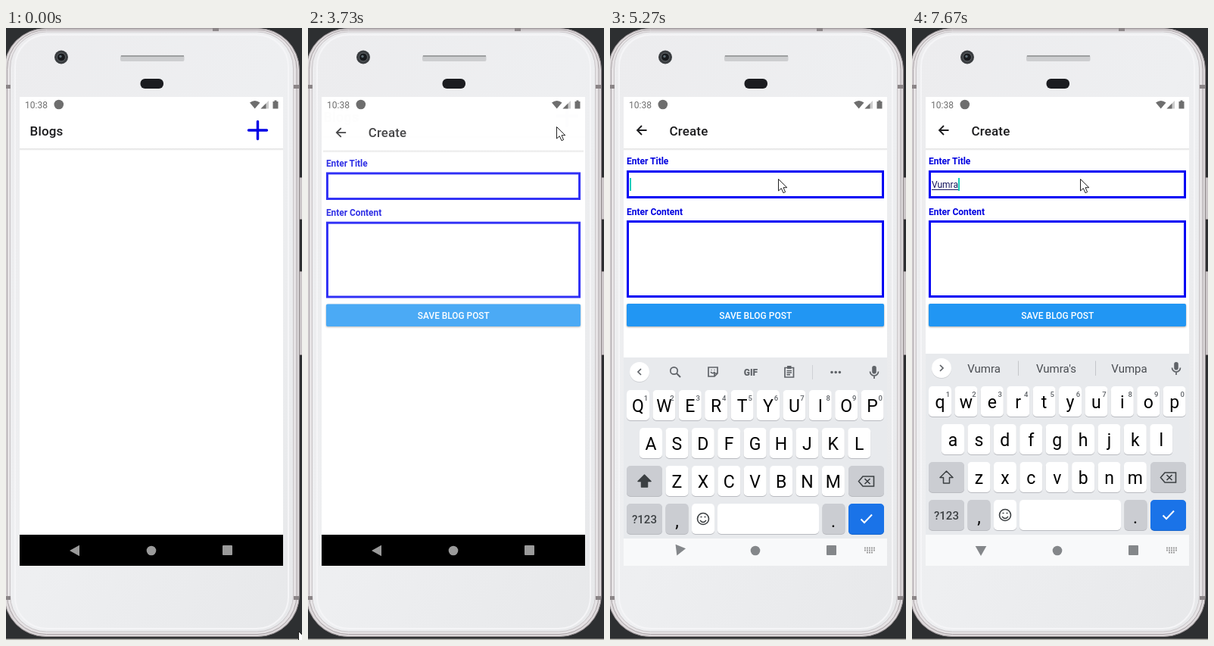
Write an HTML page that moves like this. It is 391x808 px and loops after 8 s.

```html
<!DOCTYPE html>
<html lang="en">
<head>
<meta charset="utf-8">
<title>Blog app demo</title>
<style>
  html, body { margin: 0; width: 100%; height: 100%; overflow: hidden; background: #2d2f31; }
  svg { display: block; font-family: Roboto, sans-serif; }
  .title { font-size: 17px; font-weight: 500; letter-spacing: .15px; fill: #1c1c1e; }
  .label { font-size: 12px; font-weight: 700; fill: #0000e0; }
  .box { fill: #fff; stroke: #0000f4; stroke-width: 3; }
  .button { fill: #2196f3; filter: drop-shadow(0 1px 1px #0005); }
  .mid { text-anchor: middle; }
  .line { fill: none; stroke: #5f6368; stroke-width: 1.7; }
  .dark { fill: none; stroke: #3c4043; stroke-width: 1.6; }
  .key { font-size: 23px; text-anchor: middle; }
  .hint { font-size: 9.5px; font-weight: 500; fill: #5f6368; text-anchor: middle; }
  .suggest { font-size: 15px; fill: #4a4d52; text-anchor: middle; }
</style>
</head>
<body>
<svg width="391" height="808" viewBox="0 0 391 808">
  <defs>
    <linearGradient id="body" x2="1" y2="1">
      <stop offset="0" stop-color="#ececee"/><stop offset=".5" stop-color="#eeeff1"/><stop offset="1" stop-color="#e7e8ea"/>
    </linearGradient>
    <linearGradient id="shade" x2="0" y2="1">
      <stop offset="0" stop-color="#dedede"/><stop offset="1" stop-color="#fff"/>
    </linearGradient>
    <clipPath id="page"><path d="M18 91H366V669H18z"/></clipPath>
    <clipPath id="screen"><path d="M18 91H366V710H18z"/></clipPath>
    <g id="header"><path d="M18 91H366V669H18z" fill="#fff"/><path d="M18 159H366V162H18z" fill="url(#shade)"/></g>
  </defs>

  <!-- phone -->
  <path d="M0 806.5H391V808H0z" fill="#b9b8b2"/>
  <g fill="#cbc6c8" stroke="#8a8385">
    <rect x="386" y="197.5" width="8" height="55" rx="2"/>
    <rect x="386" y="321.5" width="8" height="110" rx="2"/>
  </g>
  <rect x="-2.5" y=".5" width="390" height="803" rx="55" fill="#dcd8da" stroke="#8f888b"/>
  <rect x="1.5" y="2.5" width="382.5" height="798" rx="52" fill="#e6e3e5" stroke="#aaa3a6"/>
  <rect x="5.5" y="5" width="374" height="792" rx="48" fill="url(#body)" stroke="#c9c5c8"/>
  <rect x="12" y="9" width="361" height="784" rx="42" fill="none" stroke="#f5f5f7" stroke-width="2"/>
  <path d="M0 75H6V80H0zM380 75H387V80H380zM0 750H6V755H0zM380 750H387V755H380zM273 0H281V4H273z" fill="#8b8587"/>
  <circle cx="73" cy="38.5" r="9" fill="#3a3d40"/>
  <circle cx="73" cy="38.5" r="5.5" fill="#17191c" stroke="#62676a"/>
  <circle cx="72" cy="37.5" r="1.7" fill="#5c6b73"/>
  <rect x="151" y="36" width="84.5" height="8" rx="2" fill="#cdced0"/>
  <path d="M152 37H235" stroke="#8e8f91" stroke-width="1.5"/>
  <rect x="177.5" y="67" width="30.5" height="13" rx="6" fill="#1b1c20"/>

  <!-- app pages -->
  <path d="M18 91H366V669H18z" fill="#fff"/>
  <g clip-path="url(#page)">
    <g id="blogs">
      <use href="#header"/>
      <text class="title" x="31.5" y="141.5">Blogs</text>
      <path d="M320.5 135H344.500M332.500 123.500V146.500" stroke="#0000e6" stroke-width="3.4" stroke-linecap="round"/>
    </g>
    <g id="create">
      <use href="#header"/>
      <path d="M48.5 135H36.5M42 129L36 135L42 141" fill="none" stroke="#1c1c1e" stroke-width="1.8"/>
      <text class="title" x="78.5" y="141.5">Create</text>
      <text class="label" x="22" y="180">Enter Title</text>
      <rect class="box" x="23.5" y="189.5" width="337" height="34"/>
      <text class="label" x="22" y="246.5">Enter Content</text>
      <rect class="box" x="23.5" y="255.5" width="337" height="99"/>
      <rect class="button" x="22" y="364" width="340" height="30" rx="2"/>
      <text class="mid" x="192.3" y="384" font-size="12" font-weight="500" fill="#fff">SAVE BLOG POST</text>
      <text id="typed" x="26" y="211" font-size="12" fill="#15155e"></text>
      <path id="underline" stroke="#15155e"/>
      <rect id="caret" y="198" width="2" height="17" fill="#14cdbb"/>
    </g>
  </g>
  <g fill="#6e6e6e">
    <text x="25" y="105.8" font-size="12">10:38</text>
    <circle cx="69.8" cy="101" r="6.3"/>
    <path d="M322 98.5Q328.700 93.500 335.500 98.500L328.700 106.500z"/>
    <path d="M347 96V106.5H336.5z" opacity=".35"/><path d="M343.5 99.5V106.5H336.5z"/>
    <path d="M352.5 97H354.5V95.5H357.5V97H359.5V106.5H352.5z"/>
  </g>

  <!-- system bar and keyboard -->
  <path d="M18 669H366V710H18z"/>
  <g clip-path="url(#screen)">
    <g id="keyboard">
      <path d="M18 430H366V669H18z" fill="#e8eaed"/>
      <path d="M18 669H366V710H18z" fill="#f8f9fa"/>
      <circle cx="39" cy="450" r="13" fill="#cfd1d5"/><circle cx="39" cy="449" r="13" fill="#fff"/>
      <path id="chevron" class="line"/>
      <g id="tools" class="line">
        <circle cx="84.5" cy="447.5" r="4.7"/><path d="M88 451L93 456" stroke-width="2"/>
        <path d="M130 443H142V451L138 455H130zM142 451H138V455M133 449Q135.5 452.5 138.5 449M133.5 446.5H134.5M137.5 446.5H138.5"/>
        <text class="mid" x="186" y="453.5" font-size="12" font-weight="900" fill="#5f6368" stroke="none">GIF</text>
        <path d="M231 443.5H242.5V456H231zM233.5 447.5H240M233.5 450H240M233.5 452.7H238"/><path d="M234 443H239.5" stroke-width="4"/>
        <path d="M267.5 440V459" style="stroke:#cfd1d5;stroke-width:1"/>
        <path d="M293 449.5h.01M298.2 449.5h.01M303.4 449.5h.01" stroke-width="3.6" stroke-linecap="round"/>
      </g>
      <g id="suggestions">
        <path d="M140.5 439.5V459M242.5 439.5V459" stroke="#c4c6ca"/>
        <text class="suggest" x="95" y="454.5"></text>
        <text class="suggest" x="190.5" y="454.5"></text>
        <text class="suggest" x="287" y="454.5"></text>
      </g>
      <rect x="346.2" y="441" width="5.6" height="10.5" rx="2.8" fill="#5f6368"/>
      <path class="line" d="M343.5 448.5A5.5 5.5 0 0 0 354.5 448.5M349 454V458"/>
      <g id="keys"></g>
      <path id="shift" d="M45.5 585L54 593.5H49.5V601H41.5V593.5H37z" stroke="#3c4043" stroke-width="1.5" stroke-linejoin="round"/>
      <g class="dark">
        <path d="M334 587H348.5V600H334L328.5 593.5zM336.5 590L343.5 597M343.5 590L336.5 597"/>
        <circle cx="123" cy="643" r="7.5"/>
        <path d="M119 645Q123 650 127 645M119.5 640.5H121.5M124.5 640.5H126.5"/>
        <path d="M331.5 643.5L336 648L346 637.5" stroke="#fff" stroke-width="2"/>
      </g>
    </g>
  </g>
  <g id="nav">
    <path id="back" d="M84 690L97 682.7V697.3z"/>
    <circle cx="192" cy="690" r="6.3"/>
    <rect x="286" y="683" width="13" height="13" rx="1"/>
    <path id="ime" d="M336 686.5H350M336 689.5H350M339 692.5H347" fill="none" stroke="#999" stroke-width="1.8" stroke-dasharray="1.9 1.1"/>
  </g>
  <path id="cursor" d="M.5 .5V16L4.3 12.7L7 18.7L9.6 17.5L7 11.7H11.8z" fill="#fff" stroke="#222"/>
</svg>
<script>
const $ = id => document.getElementById(id);
const show = (el, on) => el.setAttribute('visibility', on ? 'inherit' : 'hidden');
const place = (el, transform) => el.setAttribute('transform', transform);
const clamp = v => Math.min(1, Math.max(0, v));

const LOOP = 8000, STEP = 1000 / 15, PITCH = 34.4;
const WORD = 'Vumra';
// Tick, letters typed, letters underlined, suggestions
const TYPING = [
  [0, 0, 0, ''],
  [95, 1, 0, ''],
  [98, 2, 1, 'V Very Video'],
  [101, 3, 2, 'Vu View Vue'],
  [104, 3, 3, 'Vum Vu Vim'],
  [105, 3, 3, 'Vum Vumra Vim'],
  [108, 4, 3, 'Vum Vumra Vim'],
  [111, 5, 4, 'Vumr Vumra Vumpa'],
  [114, 5, 5, 'Vumra Vumr Vumpa'],
  [115, 5, 5, "Vumra Vumra's Vumpa"]
];

// Tick, x, y of the pointer
const POINTER = [
  [22, 384, 333], [24, 362, 246], [26, 336, 163], [28, 321, 129], [29, 321, 131], [31, 328, 130],
  [64, 328, 130], [65, 323, 135], [66, 306, 147], [68, 264, 175], [70, 227, 196], [71, 222, 199]
];

function keyCap(x, y, w, fill, edge = '#b9bbc0') {
  const rect = (dy, color) => `<rect x="${x}" y="${y + dy}" width="${w}" height="40" rx="5" fill="${color}"/>`;
  return rect(1, edge) + rect(0, fill);
}

function buildKeys() {
  let out = '';
  [['QWERTYUIOP', 37, 473], ['ASDFGHJKL', 54, 523], ['ZXCVBNM', 88.5, 573]].forEach(([row, left, y], r) =>
    [...row].forEach((ch, i) => {
      const x = left + i * PITCH;
      out += keyCap(x - 15, y, 30, '#fff') + `<text class="key letter" x="${x}" y="${y + 28.5}">${ch}</text>`;
      if (r === 0) out += `<text class="hint" x="${x + 10.5}" y="${y + 14}">${(i + 1) % 10}</text>`;
    }));
  const gray = '#cbcdd2';
  [[22, 573, 47, gray], [315, 573, 47, gray], [22, 623, 47, gray], [73.5, 623, 30, gray],
   [108, 623, 30, '#fff'], [142, 623, 134, '#fff'], [280.5, 623, 30, gray], [315, 623, 47, '#1a73e8', '#1765cc']]
    .forEach(k => out += keyCap(...k));
  $('keys').innerHTML = out +
    '<text class="mid" x="45.5" y="648.5" font-size="15" font-weight="500" fill="#3c4043">?123</text>' +
    '<text class="key" x="88.5" y="654">,</text><text class="key" x="295" y="654">.</text>';
}

buildKeys();
const letters = [...document.querySelectorAll('.letter')];
const suggestTexts = [...document.querySelectorAll('.suggest')];

function along(points, t) {
  const next = points.findIndex(p => p[0] > t);
  if (next < 0) return points[points.length - 1].slice(1);
  const a = points[next - 1], b = points[next], u = (t - a[0]) / (b[0] - a[0]);
  return [a[1] + (b[1] - a[1]) * u, a[2] + (b[2] - a[2]) * u];
}

function drawPointer(tick) {
  const visible = tick < 18 || tick >= 22;
  show($('cursor'), visible);
  if (visible) place($('cursor'), `translate(${tick < 18 ? [386, 796] : along(POINTER, tick)})`);
}

// Cards grow from the centre and cross-fade
function drawPages(tick) {
  const p = tick < 55 ? 0 : 1 - (1 - clamp((tick - 54.2) / 3.8)) ** 4;
  const card = (el, scale, opacity) => {
    place(el, `translate(192 400) scale(${scale}) translate(-192 -400)`);
    el.setAttribute('opacity', opacity);
  };
  card($('blogs'), 1 + .075 * p, p < .2 ? 1 - p * 3.35 : .33 * (1 - p) / .8);
  card($('create'), .85 + .15 * p, p < .8 ? p * .625 : .5 + (p - .8) * 2.5);
}

function drawTyping(tick) {
  const [, count, lined, words] = TYPING.filter(s => s[0] <= tick).pop();
  const typing = count > 0, text = $('typed');
  text.textContent = WORD.slice(0, count);
  const widthOf = n => n ? text.getSubStringLength(0, n) : 0;
  $('underline').setAttribute('d', lined ? `M26 213.5h${widthOf(lined)}` : '');
  $('caret').setAttribute('x', 26 + Math.round(widthOf(count)));
  show($('caret'), tick >= 75 && (tick < 83 || tick >= 91));

  show($('tools'), !typing);
  show($('suggestions'), typing);
  const parts = words.split(' ');
  suggestTexts.forEach((el, i) => el.textContent = parts[i] || '');
  letters.forEach(el => {
    const ch = el.textContent;
    el.textContent = typing ? ch.toLowerCase() : ch.toUpperCase();
  });
  $('shift').setAttribute('fill', typing ? 'none' : '#3c4043');
  $('chevron').setAttribute('d', typing ? 'M37 445L41 449L37 453' : 'M41 445L37 449L41 453');
}

function drawKeyboard(tick) {
  const since = tick - 77, open = since >= 0;
  show($('keyboard'), open);
  show($('ime'), open);
  if (open) {
    place($('keyboard'), `translate(0 ${Math.round(205 * .156 ** since)})`);
    $('keyboard').setAttribute('opacity', clamp(.17 + since * .6));
  }
  const turn = 1 - (1 - clamp(since / 4)) ** 2;
  place($('back'), `rotate(${-90 * turn} 91 690)`);
  $('nav').setAttribute('fill', since >= 2 ? '#84878a' : '#9a9a9a');
}

let shown = -1;
function draw(now) {
  // The screen updates fifteen times a second
  const tick = Math.floor((now % LOOP + 4) / STEP);
  if (tick !== shown) {
    shown = tick;
    drawPointer(tick);
    drawPages(tick);
    drawTyping(tick);
    drawKeyboard(tick);
  }
  requestAnimationFrame(draw);
}
draw(performance.now());
</script>
</body>
</html>
```
